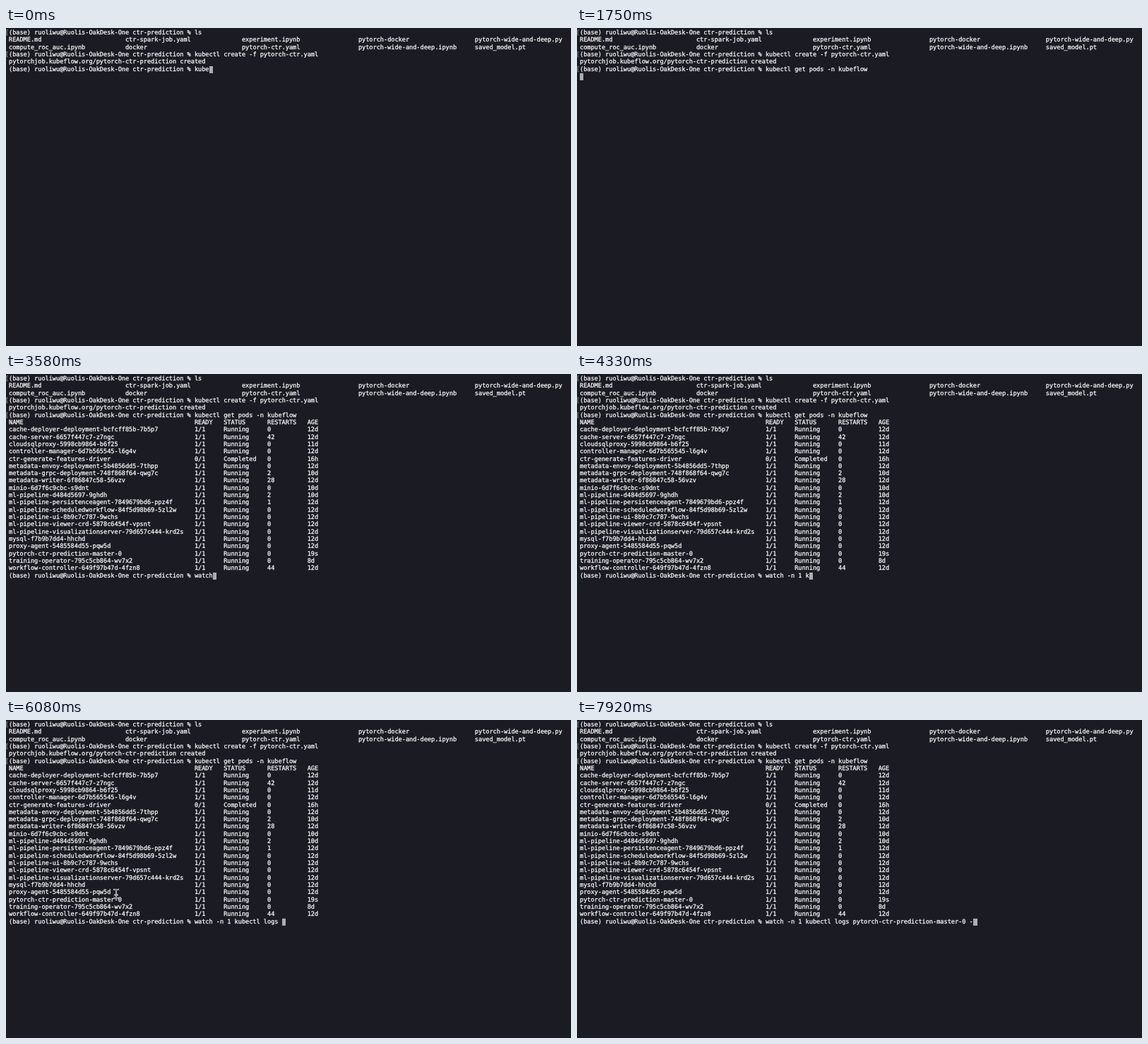
These frames come from a looping animation (800x450 px, 8 s). An HTML page:

```html
<!DOCTYPE html>
<html lang="en">
<head>
<meta charset="utf-8">
<title>Terminal session</title>
<style>
  :root { --cw: 5.162px; --lh: 10.32px; }
  html, body { margin: 0; width: 100%; height: 100%; overflow: hidden; background: #1b1b24; }
  #stage { position: absolute; left: 0; top: 0; width: 800px; height: 450px; overflow: hidden; background: #1b1b24; }
  /* the tiny turn keeps text baselines from snapping to whole pixels */
  #screen { position: absolute; left: 3.7px; top: 2.1px; transform: rotate(.004deg); transform-origin: 0 0; }
  .row, .mark {
    position: absolute; left: 0; margin: 0; white-space: pre; color: #fafafa;
    font: 8.575px/var(--lh) "DejaVu Sans Mono", monospace;
    -webkit-text-stroke: .28px currentColor;
    text-rendering: geometricPrecision; font-kerning: none; font-variant-ligatures: none;
  }
  .mark { left: calc(-1 * var(--cw)); color: #7f7f86; }
  #caret, #pick { position: absolute; height: var(--lh); }
  #caret { width: var(--cw); background: #adadb0; }
  #pick { background: #46474f; }
  #beam { position: absolute; left: -5px; top: -8px; width: 10px; height: 16px; overflow: visible; }
</style>
</head>
<body>
<div id="stage">
  <div id="screen"><div id="pick"></div><div id="caret"></div></div>
  <svg id="beam" viewBox="-5 -8 10 16" fill="none" stroke-linecap="round">
    <path d="M-3.2-6.3Q-.6-6.3 0-5Q.6-6.3 3.2-6.3M0-5V5M-3.2 6.3Q-.6 6.3 0 5Q.6 6.3 3.2 6.3M-1.8 1.6H1.8" stroke="#e9e9eb" stroke-width="2"/>
    <path d="M-3-6.3Q-.6-6.3 0-5Q.6-6.3 3-6.3M0-5V5M-3 6.3Q-.6 6.3 0 5Q.6 6.3 3 6.3" stroke="#202026" stroke-width=".7"/>
  </svg>
</div>
<script>
const LOOP = 8000, FPS = 12, CW = 5.162, LH = 10.32, LEFT = 3.7;
const PROMPT = '(base) ruoliwu@Ruolis-OakDesk-One ctr-prediction % ';
const FIRST = 'kubectl get pods -n kubeflow';
const SECOND = 'watch -n 1 kubectl logs pytorch-ctr-prediction-master-0 -';
const POD_ROW = 24, POD_LEN = 31, LAST_ROW = 27;
const ENTER = 21, OUTPUT = 31;

const files = [
  ['README.md', 'ctr-spark-job.yaml', 'experiment.ipynb', 'pytorch-docker', 'pytorch-wide-and-deep.py'],
  ['compute_roc_auc.ipynb', 'docker', 'pytorch-ctr.yaml', 'pytorch-wide-and-deep.ipynb', 'saved_model.pt']
];

// name, restarts, age
const pods = `cache-deployer-deployment-bcfcff85b-7b5p7 0 12d
cache-server-6657f447c7-z7ngc 42 12d
cloudsqlproxy-5998cb9864-b6f25 0 11d
controller-manager-6d7b565545-l6g4v 0 12d
ctr-generate-features-driver 0 16h
metadata-envoy-deployment-5b4856dd5-7thpp 0 12d
metadata-grpc-deployment-748f868f64-qwg7c 2 10d
metadata-writer-6f86847c58-56vzv 28 12d
minio-6d7f6c9cbc-s9dnt 0 10d
ml-pipeline-d484d5697-9ghdh 2 10d
ml-pipeline-persistenceagent-7849679bd6-ppz4f 1 12d
ml-pipeline-scheduledworkflow-84f5d98b69-5zl2w 0 12d
ml-pipeline-ui-8b9c7c787-9wchs 0 12d
ml-pipeline-viewer-crd-5878c6454f-vpsnt 0 12d
ml-pipeline-visualizationserver-79d657c444-krd2s 0 12d
mysql-f7b9b7dd4-hhchd 0 12d
proxy-agent-5485584d55-pqw5d 0 12d
pytorch-ctr-prediction-master-0 0 19s
training-operator-795c5cb864-wv7x2 0 8d
workflow-controller-649f97b47d-4fzn8 44 12d`.split('\n').map(line => line.split(' '));

// typing runs: first tick, ticks, length at the end
const firstRuns = [[2, 3, 8], [6, 9, 21], [16, 5, 28]];
const secondRuns = [[39, 3, 3], [43, 2, 6], [46, 5, 11], [52, 1, 12], [54, 9, 23],
                    [66, 1, 24], [92, 1, 56], [95, 1, 57]];

// pointer: tick, x, y
const path = [
  [68, 75.5, 207.5], [70, 80, 210], [71, 104, 221], [72, 133, 235], [73, 156, 246], [74, 166.5, 251.5],
  [76, 158, 252], [77, 136, 252], [78, 106, 252], [79, 72, 252], [80, 40, 252], [81, 16, 252],
  [82, 4, 252], [83, 70, 254], [84, 260, 260], [85, 451, 268.5],
  [86, 528, 278], [87, 556, 281], [88, 556, 281.5], [89, 555.5, 282]
];
const DRAG = 76, DRAG_END = 82, CLEAR = 90, HIDE = 92;

const $ = id => document.getElementById(id);
const screen = $('screen'), caret = $('caret'), pick = $('pick'), beam = $('beam');

function addRow(row, text, cls = 'row') {
  const el = document.createElement('div');
  el.className = cls;
  el.style.top = row * LH + 'px';
  el.textContent = text;
  screen.append(el);
  return el;
}

const tableLine = (name, ready, status, restarts, age) =>
  name.padEnd(51) + ready.padEnd(8) + status.padEnd(12) + restarts.padEnd(11) + age;

addRow(0, PROMPT + 'ls');
files.forEach((list, i) => addRow(1 + i, list.map(f => f.padEnd(32)).join('').trimEnd()));
addRow(3, PROMPT + 'kubectl create -f pytorch-ctr.yaml');
addRow(4, 'pytorchjob.kubeflow.org/pytorch-ctr-prediction created');
const firstLine = addRow(5, '');
const output = [addRow(6, tableLine('NAME', 'READY', 'STATUS', 'RESTARTS', 'AGE'))];
pods.forEach(([name, restarts, age], i) => {
  const done = name.startsWith('ctr-');
  output.push(addRow(7 + i, tableLine(name, done ? '0/1' : '1/1', done ? 'Completed' : 'Running', restarts, age)));
});
const secondLine = addRow(LAST_ROW, '');
output.push(secondLine);
addRow(0, '[', 'mark');
addRow(3, '[', 'mark');
const enterMark = addRow(5, '[', 'mark');

function typed(runs, start, tick) {
  let len = start;
  for (const [from, ticks, end] of runs) {
    if (tick < from) break;
    len += Math.round((end - len) * Math.min(1, (tick - from + 1) / ticks));
  }
  return len;
}

const pointAt = tick => path.filter(p => p[0] <= tick).pop();
const show = (el, on) => { el.style.visibility = on ? 'visible' : 'hidden'; };

function draw(tick) {
  const a = typed(firstRuns, 4, tick), b = typed(secondRuns, 0, tick);
  firstLine.textContent = PROMPT + FIRST.slice(0, a);
  secondLine.textContent = PROMPT + SECOND.slice(0, b);
  show(enterMark, tick >= ENTER);
  output.forEach(el => show(el, tick >= OUTPUT));

  const [row, col] = tick < ENTER ? [5, PROMPT.length + a]
    : tick < OUTPUT ? [6, 0] : [LAST_ROW, PROMPT.length + b];
  caret.style.left = col * CW + 'px';
  caret.style.top = row * LH + 'px';

  const point = pointAt(tick);
  show(beam, point && tick < HIDE);
  if (point) beam.style.transform = `translate(${point[1]}px, ${point[2]}px)`;

  const picking = tick >= DRAG && tick < CLEAR;
  show(pick, picking);
  if (picking) {
    const x = pointAt(Math.min(tick, DRAG_END))[1];
    const from = Math.max(0, Math.round((x - LEFT) / CW));
    pick.style.left = from * CW + 'px';
    pick.style.top = POD_ROW * LH + 'px';
    pick.style.width = Math.max(0, POD_LEN - from) * CW + 'px';
  }
}

let last = -1;
const origin = performance.now();
function loop(now) {
  const t = Math.max(0, now - origin) % LOOP;
  const tick = Math.min(LOOP / 1000 * FPS - 1, Math.floor((t + 5) * FPS / 1000));
  if (tick !== last) draw(last = tick);
  requestAnimationFrame(loop);
}
draw(0);
requestAnimationFrame(loop);
</script>
</body>
</html>
```
